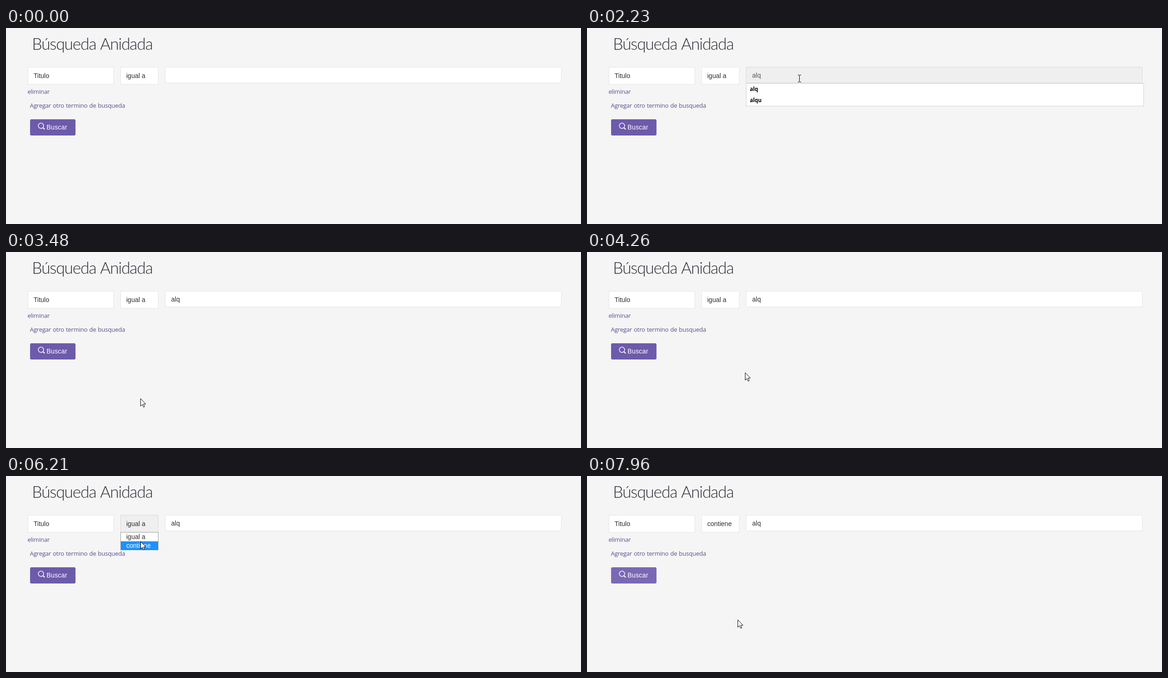
Write an HTML page that moves like this. It is 1241 px wide and 423 px high and loops after 8000 ms.

```html
<!DOCTYPE html>
<html lang="es">
<head>
<meta charset="utf-8">
<title>Búsqueda Anidada</title>
<style>
html, body { margin: 0; width: 100%; height: 100%; overflow: hidden; background: #f5f5f5; }
svg { display: block; }
text { white-space: pre; }
.title { font: 300 35px Lato, "Open Sans", sans-serif; letter-spacing: -1.3px; word-spacing: 1.5px; fill: #2e2a35; }
.link { font: 13px "Open Sans", "Noto Sans", sans-serif; letter-spacing: -.25px; word-spacing: .75px; fill: #5f4b8f; }
.input { font: 14px "Liberation Sans", Arial, sans-serif; fill: #2d2d2d; }
.buscar { font: 14px "Liberation Sans", Arial, sans-serif; letter-spacing: .15px; fill: #fff; }
.hint { font: 700 11.5px "Open Sans", "Noto Sans", sans-serif; fill: #000; }
.box { fill: #fff; stroke: #e5e5e5; }
.line { fill: none; stroke: #000; }
.shape { fill: #fff; stroke: #000; stroke-linejoin: round; }
</style>
</head>
<body>
<svg width="1241" height="423" viewBox="0 0 1241 423">
  <g id="page">
    <text class="title" x="56" y="47">Búsqueda Anidada</text>
    <rect class="box" x="47.5" y="84.5" width="185" height="37"/>
    <text class="input" x="59.5" y="108">Titulo</text>
    <rect class="box" id="select" x="247.5" y="84.5" width="81" height="37"/>
    <text class="input" id="operator" x="259.5" y="108"></text>
    <rect class="box" id="field" x="343.5" y="84.5" width="855" height="34"/>
    <text class="input" id="query" x="356.5" y="107"></text>
    <path id="squiggle" fill="none" stroke="#e33" stroke-width="1"/>
    <rect id="caret" y="94" width="1" height="16" fill="#222"/>
    <text class="link" x="46.5" y="142">eliminar</text>
    <text class="link" x="51.5" y="172">Agregar otro termino de busqueda</text>
    <rect id="button" x="52" y="197" width="98" height="35" rx="3"/>
    <g fill="none" stroke="#fff" stroke-width="1.4">
      <circle cx="75.5" cy="211" r="5.8"/>
      <path d="M79.7 215.2l3.8 3.6" stroke-width="2"/>
    </g>
    <text class="buscar" x="87.5" y="219">Buscar</text>
    <g id="hints">
      <rect x="343.5" y="119.5" width="858" height="49" fill="#fff" stroke="#d0d0d0"/>
      <rect id="hintRow" x="344" width="857" height="24" fill="#e6e6e6"/>
      <text class="hint" x="351.5" y="136">alq</text>
      <text class="hint" x="351.5" y="160">alqu</text>
    </g>
    <g id="popup">
      <rect x="247.5" y="121.5" width="81" height="38" fill="#fff" stroke="#999"/>
      <rect id="option" x="248" width="80" height="19" fill="#1e90ff"/>
      <text class="input" id="opt0" x="259.5" y="136">igual a</text>
      <text class="input" id="opt1" x="259.5" y="155">contiene</text>
    </g>
  </g>
  <g id="cursor">
    <path id="arrow" class="shape" d="M.5 .5V16.5L4.2 13L6.8 18.8L9.2 17.8L6.7 12.1H11.6Z"/>
    <path id="beam" class="line" d="M-3 -7.5H0M1 -7.5H4M.5 -7V7M-3 7.5H0M1 7.5H4"/>
    <g id="hand">
      <path class="shape" d="M-1.5 14V1.8Q-1.5 .5 0 .5T1.5 1.8V8Q3.6 7 4.7 8.6Q6.7 7.8 7.7 9.4Q10.2 8.8 10.5 11.2V16Q10.5 19 8.5 21V23.5H-1V21.5L-5.5 14.5Q-6.3 12.5 -5 11.8Q-3.5 11.3 -1.5 14Z"/>
      <path class="line" d="M1.5 8v4M4.7 8.6v3.6M7.7 9.4v3"/>
    </g>
  </g>
</svg>
<script>
const LOOP = 8000, FADE = 150;
const $ = id => document.getElementById(id);
const show = (id, on) => $(id).setAttribute('visibility', on ? 'inherit' : 'hidden');
const clamp = v => Math.max(0, Math.min(1, v));
const within = (t, a, b) => t >= a && t < b;
const ease = p => 1 - (1 - p) ** 1.5;

// Pointer moves: start, end, number of steps, target x, target y
const START = [1150, 434];
const MOVES = [
  [70, 840, 12, 458, 109],
  [2470, 2800, 5, 177, 211],
  [2940, 2940, 1, 149, 212],
  [3180, 3480, 5, 290, 316],
  [4260, 4580, 5, 468, 120],
  [4730, 4880, 3, 462, 105],
  [5110, 5340, 4, 348, 105],
  [5430, 5580, 3, 290, 110],
  [5990, 6220, 4, 290, 145],
  [6450, 6770, 5, 455, 103],
  [6840, 6840, 1, 456, 102],
  [6990, 7340, 6, 140, 215],
  [7550, 7630, 2, 200, 246],
  [7710, 7960, 4, 325, 310]
];
const FIELD_FOCUS = [[990, 3020], [5040, 5500], [6770, 7600]];
const SELECT_FOCUS = [[5500, 6920]];
const BUTTON_HOVER = [[2940, 3140], [7340, 7940]];
// Moments at which the caret's blink starts again
const CARET = [990, 1470, 1620, 1680, 5040, 6840];

function pointer(t) {
  let [x, y] = START;
  for (const [a, b, n, tx, ty] of MOVES) {
    if (t < a) break;
    const step = b > a ? Math.min(n - 1, Math.floor((t - a) / (b - a) * (n - 1) + 1e-6)) : 0;
    const p = ease((step + 1) / n);
    x += (tx - x) * p;
    y += (ty - y) * p;
  }
  return [Math.round(x), Math.round(y)];
}

function level(spans, t) {
  let v = 0;
  for (const [a, b] of spans) {
    if (t >= a) v = t < b ? clamp((t - a) / FADE) : 1 - clamp((t - b) / FADE);
  }
  return v;
}

function mix(from, to, p) {
  return `rgb(${from.map((c, i) => Math.round(c + (to[i] - c) * p))})`;
}

function shade(id, p) {
  $(id).style.fill = mix([255, 255, 255], [239, 239, 239], p);
  $(id).style.stroke = mix([229, 229, 229], [218, 218, 218], p);
}

function typed(t) {
  return 'alq'.slice(0, t < 1470 ? 0 : t < 1620 ? 1 : t < 1680 ? 2 : 3);
}

function drawPointer(x, y, popup) {
  const overField = !popup && within(x, 343, 1199) && within(y, 84, 119);
  const overButton = within(x, 52, 151) && within(y, 197, 232);
  const overLink = within(x, 52, 256) && within(y, 160, 175);
  const kind = overField ? 'beam' : overButton || overLink ? 'hand' : 'arrow';
  for (const id of ['arrow', 'beam', 'hand']) show(id, id === kind);
  $('cursor').setAttribute('transform', `translate(${x} ${y})`);
}

function draw(t) {
  const [x, y] = pointer(t);
  const focus = level(FIELD_FOCUS, t);
  const popup = within(t, 5650, 6300);
  const hints = within(t, 1470, 3020);
  const text = typed(t);

  show('page', !within(t, 3860, 4030));
  show('cursor', t >= 70);
  drawPointer(x, y, popup);

  shade('field', focus);
  shade('select', level(SELECT_FOCUS, t));
  $('button').style.fill = mix([110, 90, 171], [125, 106, 182], level(BUTTON_HOVER, t));
  $('query').textContent = text;
  $('query').style.fill = mix([45, 45, 45], [85, 85, 85], focus);
  $('operator').textContent = t < 6300 ? 'igual a' : 'contiene';

  const focused = FIELD_FOCUS.some(([a, b]) => within(t, a, b));
  const since = t - Math.max(0, ...CARET.filter(c => c <= t));
  show('caret', focused && since % 1080 < 540);
  $('caret').setAttribute('x', [357, 364, 367, 375][text.length]);
  show('squiggle', within(t, 5040, 5500));

  show('hints', hints);
  const row = y < 144 ? 0 : 1;
  show('hintRow', hints && x > 343 && within(y, 120, 168));
  $('hintRow').setAttribute('y', 120 + 24 * row);

  show('popup', popup);
  const pick = y < 141 ? 0 : 1;
  $('option').setAttribute('y', 122 + 19 * pick);
  $('opt0').style.fill = pick ? '#2d2d2d' : '#fff';
  $('opt1').style.fill = pick ? '#fff' : '#2d2d2d';
}

$('squiggle').setAttribute('d', 'M356.5 109.5' + 'l2 -2l2 2'.repeat(5));

const begin = performance.now();
function tick() {
  draw((performance.now() - begin) % LOOP);
  requestAnimationFrame(tick);
}
tick();
</script>
</body>
</html>
```
